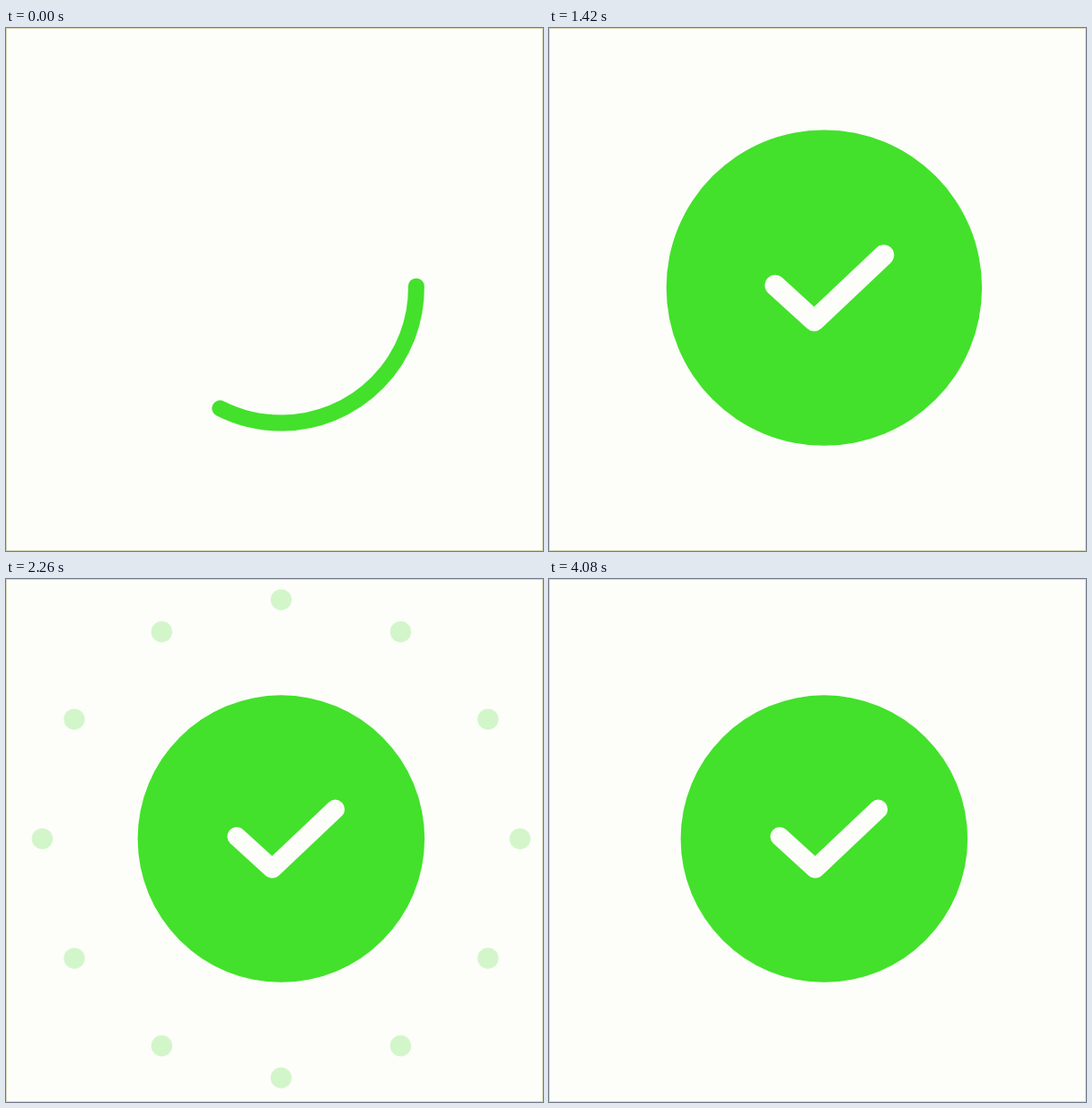
Recreate the animation shown at these times as an HTML page with a canvas. Size 598 px wide and 582 px high, loop 4100 ms.

```html
<!DOCTYPE html>
<html lang="en">
<head>
<meta charset="utf-8">
<title>Success check</title>
<style>
  html, body { margin: 0; width: 100%; height: 100%; overflow: hidden; background: #fdfdfa; }
  canvas { display: block; }
</style>
</head>
<body>
<canvas id="stage" width="598" height="582"></canvas>
<script>
const ctx = document.getElementById('stage').getContext('2d');
const GREEN = '#43e12b', PAPER = '#fdfdfa', EDGE = '#d9d9bc';
const LOOP = 4100, TAU = Math.PI * 2;

// Eased progress, 0 to 1, of a move that starts at step `from`.
function ease(n, from, length) {
  const x = Math.min(1, Math.max(0, (n - from) / length));
  return x * x * (3 - 2 * x);
}

// Steps are held for 100, 20 and 20 ms in turn, after a first one of 20 ms.
function stepAt(t) {
  if (t < 20) return 0;
  const u = t - 20, rest = u % 140;
  return 1 + 3 * Math.floor(u / 140) + (rest >= 100) + (rest >= 120);
}

function disc(x, y, r) {
  ctx.beginPath();
  ctx.arc(x, y, r, 0, TAU);
  ctx.fill();
}

// Head and tail each run one full turn from the top; the tail catches up.
function drawSweep(n) {
  if (n >= 27) return;
  const top = -TAU / 4;
  ctx.lineWidth = 18;
  ctx.strokeStyle = GREEN;
  ctx.beginPath();
  ctx.arc(0, 0, 150.5, top + TAU * ease(n, -13, 40), top + TAU * ease(n, -33, 60));
  ctx.stroke();
}

function drawBurst(n) {
  const size = ease(n, 15, 34);
  ctx.globalAlpha = 1 - ease(n, 38, 16);
  for (let i = 0; i < 12; i++) {
    const a = i * TAU / 12;
    disc(266 * size * Math.cos(a), 266 * size * Math.sin(a), 11.7 * size);
  }
  ctx.globalAlpha = 1;
}

function drawBadge(n) {
  const scale = 1.1 * ease(n, 15, 16) - 0.1 * ease(n, 31, 18);
  if (!scale) return;
  ctx.save();
  ctx.scale(scale, scale);
  disc(0, 0, 159.75);
  ctx.lineWidth = 21;
  ctx.strokeStyle = PAPER;
  ctx.beginPath();
  ctx.moveTo(-49.5, -2.5);
  ctx.lineTo(-10, 33.5);
  ctx.lineTo(60.3, -33);
  ctx.stroke();
  ctx.restore();
}

function draw(n) {
  ctx.fillStyle = PAPER;
  ctx.fillRect(0, 0, 598, 582);
  ctx.lineWidth = 1;
  ctx.strokeStyle = EDGE;
  ctx.strokeRect(0.5, 0.5, 597, 581);

  ctx.save();
  ctx.translate(306.4, 289.1);
  ctx.lineCap = ctx.lineJoin = 'round';
  ctx.fillStyle = GREEN;
  drawSweep(n);
  drawBurst(n);
  drawBadge(n);
  ctx.restore();
}

const began = performance.now();
function tick() {
  draw(stepAt((performance.now() - began) % LOOP));
  requestAnimationFrame(tick);
}
tick();
</script>
</body>
</html>
```
